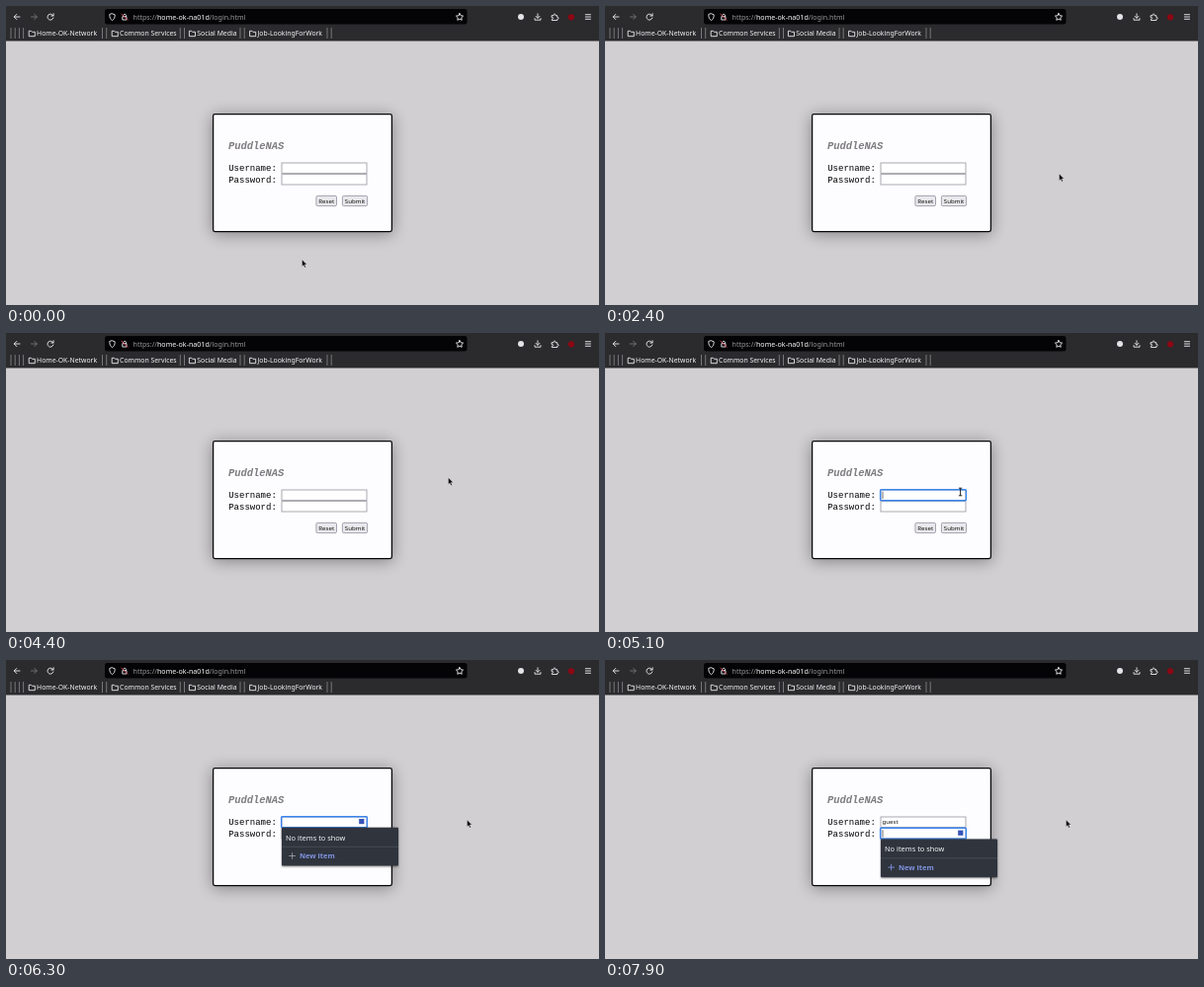
These frames come from a looping animation (600x303 px, 8 s). An HTML page:

```html
<!DOCTYPE html>
<html lang="en">
<head>
<meta charset="utf-8">
<title>Login</title>
<style>
  html, body { margin: 0; width: 100%; height: 100%; overflow: hidden; background: #d1cfd2; }
  svg { display: block; }
  text { white-space: pre; font-family: "Noto Sans", sans-serif; }
  .mono { font-family: "Liberation Mono", monospace; font-size: 9px; }
  .line { fill: none; stroke: #eeedf0; stroke-width: .9; stroke-linecap: round; stroke-linejoin: round; }
  .bookmark { font-size: 6.85px; fill: #f4f3f6; }
  .small { font-size: 6.1px; fill: #111; }
  .field { fill: #fff; stroke: #a09fa8; stroke-width: .9; }
  .button { fill: #e9e9ed; stroke: #8f8f9d; stroke-width: .8; }
</style>
</head>
<body>
<svg width="600" height="303" viewBox="0 0 600 303">
  <defs>
    <filter id="blur" x="-30%" y="-40%" width="160%" height="180%"><feGaussianBlur stdDeviation="8"/></filter>
    <filter id="soft"><feGaussianBlur stdDeviation="1.2"/></filter>
  </defs>
  <rect width="600" height="303" fill="#d1cfd2"/>

  <!-- Browser toolbar -->
  <rect width="600" height="35.5" fill="#2b2a2d"/>
  <rect x="100" y="3" width="366.5" height="15.5" rx="2.5" fill="#040305"/>
  <g class="line">
    <path d="M14 11H8.3M10.8 8.4L8.2 11l2.6 2.6"/>
    <path d="M25.5 11h5.7M28.7 8.4l2.6 2.6l-2.6 2.6" stroke="#77767a"/>
    <path d="M47.7 9.8A3 3 0 1 0 47.9 12M48.1 7.7V10H45.8"/>
    <path d="M107.5 7.8l2.7 1c0 3-.7 4.6-2.7 5.8c-2-1.2-2.7-2.8-2.7-5.8z"/>
    <path d="M118.2 10.7h3.8v3.3h-3.8zM118.8 10.5V9.3a1.4 1.4 0 0 1 2.7 0v1.2"/>
    <path d="M116.8 8l6.2 6.3" stroke="#e04b59"/>
    <path d="M459 7.5l1.1 2.2l2.5.4l-1.8 1.7l.4 2.5l-2.2-1.2l-2.2 1.2l.4-2.5l-1.8-1.7l2.5-.4z"/>
    <path d="M538 7.8v4.3M536 10.3l2 2l2-2M535 12.6v1.6h6v-1.6"/>
    <path d="M552.4 9.7h1.7c-.5-2.2 2.4-2.2 1.9 0h1.8v1.8c1.8-.4 1.8 2 0 1.7v1.3h-5.4v-1.4c1.8.3 1.8-2 0-1.7z"/>
    <path d="M586.3 8.7h5.2M586.3 11h5.2M586.3 13.3h5.2"/>
  </g>
  <circle cx="521" cy="11" r="3" fill="#e4e3e7"/>
  <circle cx="572" cy="11.3" r="3.1" fill="#8d0714"/>
  <text x="128.5" y="13.6" font-size="7.1" fill="#98979b">https://<tspan fill="#fff">home-ok-na01d</tspan>/login.html</text>
  <g id="bookmarks"></g>

  <!-- Login card -->
  <rect x="209" y="111" width="182" height="120" fill="#000" opacity=".38" filter="url(#blur)"/>
  <rect x="209.6" y="109.6" width="180.8" height="119" rx="1.8" fill="#fdfcfe" stroke="#09090b" stroke-width="1.3"/>
  <text class="mono" x="225" y="145" style="font-size:10.45px" font-weight="bold" font-style="italic" fill="#7d7b7f">PuddleNAS</text>
  <text class="mono" x="225.2" y="167">Username:</text>
  <text class="mono" x="225.2" y="178.6">Password:</text>
  <rect class="field" x="279" y="159" width="86" height="10.4"/>
  <rect class="field" x="279" y="170.6" width="86" height="10.4"/>
  <rect class="button" x="313.9" y="192.4" width="20.6" height="10.2" rx="1.4"/>
  <rect class="button" x="340.4" y="192.4" width="25.2" height="10.2" rx="1.4"/>
  <text class="small" x="324.2" y="199.8" text-anchor="middle">Reset</text>
  <text class="small" x="353" y="199.8" text-anchor="middle">Submit</text>
  <text class="small" id="typed" x="280.6" y="166.4"></text>

  <!-- Focus ring, caret and autofill popup, placed on the active field -->
  <g id="focus">
    <rect x="278.6" y="158.7" width="86.8" height="11" rx="1" fill="none" stroke="#3c86ee" stroke-width="1.4"/>
    <path id="caret" d="M281 160.6v7.4" stroke="#333" stroke-width=".7"/>
    <g id="popup">
      <rect x="357.2" y="161" width="5.2" height="5.2" fill="#3554b8"/>
      <rect x="279" y="170.4" width="118" height="39" fill="#000" opacity=".45" filter="url(#soft)"/>
      <rect x="279" y="169.8" width="118" height="38.8" rx="1" fill="#2f343d"/>
      <path d="M279 189.3h118" stroke="#4b515e" stroke-width=".8"/>
      <text x="283" y="182.6" font-size="7.4" fill="#f4f5f8">No items to show</text>
      <path id="plus" d="M286.3 198.5h6.6M289.6 195.2v6.6" stroke-width=".9"/>
      <text x="297" y="201.3" font-size="7.45" font-weight="bold" fill="#8194e2">New item</text>
    </g>
  </g>

  <g id="pointer">
    <path id="arrow" d="M0 0V6.9L1.6 5.5L2.7 8L3.9 7.5L2.8 5.1H4.9Z" fill="#0b0b0d" stroke="#eee" stroke-width=".35"/>
    <path id="beam" d="M-1.7-3.8H1.7M0-3.8V3.8M-1.7 3.8H1.7" fill="none" stroke="#111" stroke-width=".9"/>
  </g>
</svg>
<script>
const LOOP = 8000, STEP = 100;
const $ = id => document.getElementById(id);
const show = (id, on) => $(id).setAttribute("visibility", on ? "inherit" : "hidden");
const move = (id, x, y) => $(id).setAttribute("transform", `translate(${x} ${y})`);

const bar = x => `<path d="M${x} 22v11" stroke="#8c8b8f" stroke-width=".8"/>`;
const folder = (x, label) =>
  `<path class="line" d="M${x} 30.3v-5h2.3l.9 1h2.9v4z"/><text class="bookmark" x="${x + 7.9}" y="30">${label}</text>`;
$("bookmarks").innerHTML =
  [5, 9.2, 13.4, 17.6, 97.5, 101.7, 176.3, 180.5, 237, 241.2, 325, 329.2].map(bar).join("") +
  folder(23.2, "Home-OK-Network") + folder(107.2, "Common Services") +
  folder(185.4, "Social Media") + folder(246.6, "Job-LookingForWork");

// Pointer path: time, x, y
const path = [
  [0, 299.5, 257], [300, 299.5, 257], [1200, 482, 159], [1700, 482, 159],
  [2150, 444, 160], [2400, 459.5, 170], [2600, 474, 153], [2950, 497, 139],
  [3500, 476, 119.3], [4000, 454, 129], [4400, 447.5, 146.5], [4800, 359.6, 161],
  [5300, 359.6, 161], [5900, 466.5, 162], [LOOP, 466.5, 162]
];

// Slope at a key; zero where the pointer rests
function slope(i, k) {
  const a = path[i - 1], p = path[i], b = path[i + 1];
  const rests = q => !q || (q[1] === p[1] && q[2] === p[2]);
  return rests(a) || rests(b) ? 0 : (b[k] - a[k]) / (b[0] - a[0]);
}

function pointerAt(t) {
  const i = path.findIndex(p => p[0] > t) - 1;
  const a = path[i], b = path[i + 1], d = b[0] - a[0], u = (t - a[0]) / d;
  const ease = u * u * (3 - 2 * u);
  return [1, 2].map(k => a[k] + (b[k] - a[k]) * ease +
    d * u * (1 - u) * (slope(i, k) * (1 - u) - slope(i + 1, k) * u));
}

const keyTimes = [7100, 7200, 7400, 7500, 7600];

function draw(now) {
  const t = Math.floor(now % LOOP / STEP) * STEP;
  const [x, y] = pointerAt(t);
  const inField = x > 279 && x < 365 && y > 159 && y < 170;
  const onPassword = t >= 7800;

  move("pointer", x, y);
  show("arrow", !inField);
  show("beam", inField);

  $("typed").textContent = "guest".slice(0, keyTimes.filter(k => k <= t).length);
  const advance = !onPassword && t >= 7100 ? $("typed").getComputedTextLength() : 0;
  move("caret", advance, 0);
  show("caret", (t >= 4800 && t < 5300) || (t >= 5800 && t < 6300) || t >= 7100);

  move("focus", 0, onPassword ? 11.6 : 0);
  show("focus", t >= 4800);
  show("popup", (t >= 5300 && t < 7800) || t >= 7900);
  $("plus").setAttribute("stroke", onPassword ? "#8194e2" : "#9a9ca3");
  requestAnimationFrame(() => draw(performance.now()));
}
draw(performance.now());
</script>
</body>
</html>
```
